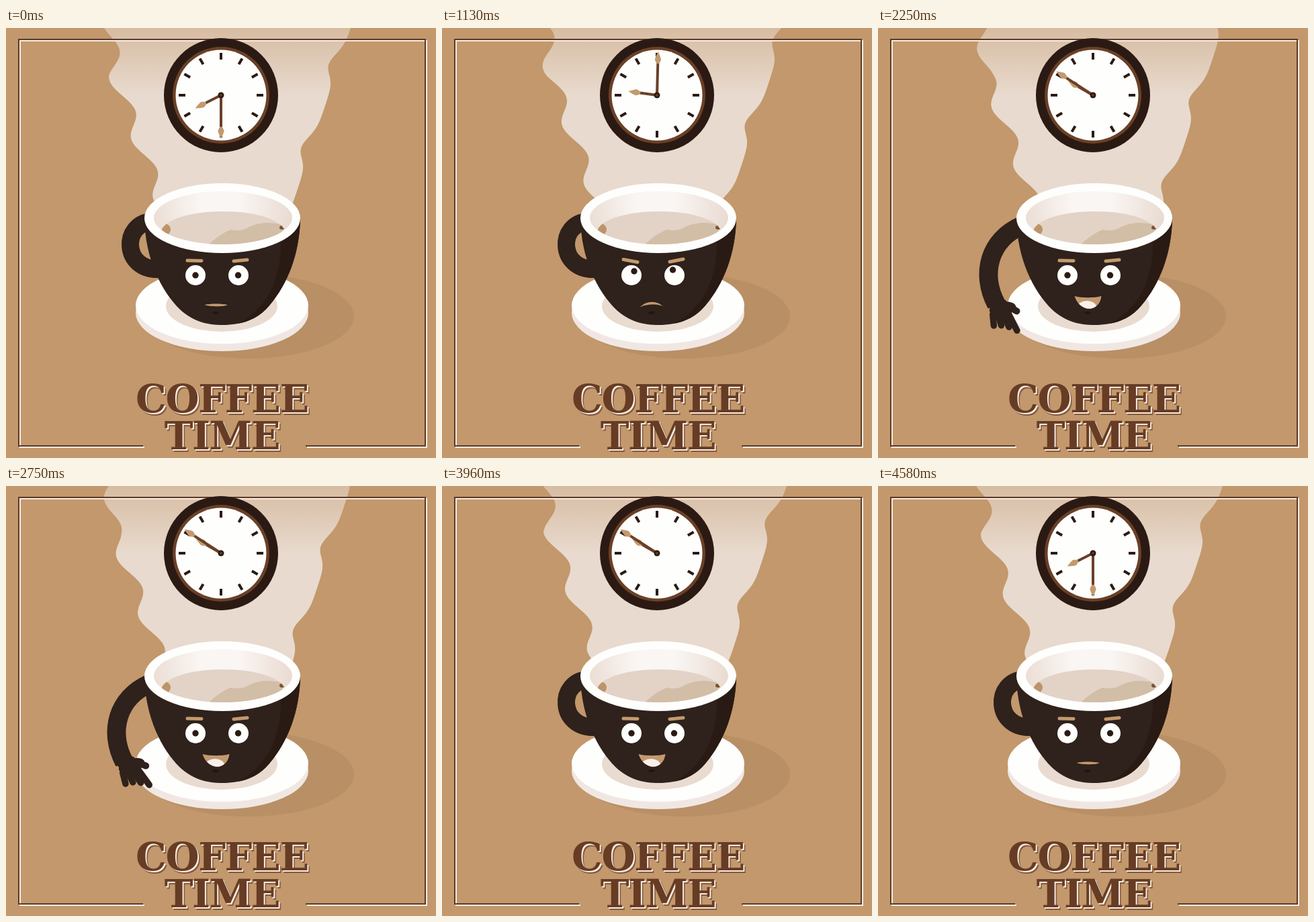
Write an HTML page with a canvas that moves like this. It is 640x640 px and loops after 4680 ms.

```html
<!DOCTYPE html>
<html lang="en">
<head>
<meta charset="utf-8">
<title>Coffee Time</title>
<style>
html, body { margin: 0; width: 100%; height: 100%; overflow: hidden; background: #c2986c; }
canvas, svg { position: absolute; left: 0; top: 0; width: 640px; height: 640px; display: block; }
text { font: bold 57.5px "DejaVu Serif", serif; letter-spacing: -1.4px; text-anchor: middle; }
</style>
</head>
<body>
<canvas id="stage" width="640" height="640"></canvas>
<svg viewBox="0 0 640 640">
  <defs>
    <g id="title"><text x="321.5" y="572">COFFEE</text><text x="321.5" y="627">TIME</text></g>
  </defs>
  <use href="#title" x="3.5" y="3.5" fill="#85583a"/>
  <use href="#title" x="2" y="2" fill="#f7eee7"/>
  <use href="#title" fill="#673c24"/>
</svg>
<script>
const ctx = document.getElementById('stage').getContext('2d');
const LOOP = 4680, TAU = Math.PI * 2, RAD = Math.PI / 180;
const BG = '#c2986c', DARK = '#2f211b', INK = '#2b1a13', BROWN = '#6a4027', TAN = '#c39a6e', WHITE = '#fefefd';

// one bezier each
const HANDLE = [218, 288, 172, 290, 173, 361, 228, 359];
const ARM = [214, 294, 166, 315, 152, 365, 176, 411];
// half width, y of the corners, bend of the upper and lower lip
const NEUTRAL = [17, 412, -2, 3], FROWN = [18, 416, -11, -6], SMILE = [20, 399, 3, 25];

const CUP = new Path2D('M206 283C207 345 232 392 258 418C278 437 300 442 322 442C352 442 375 433 392 413C420 380 437 335 438 283Z');
const SHADE = new Path2D('M438 283C437 335 420 380 392 413C378 430 362 437 345 440C385 420 410 378 409 318Z');
const FOAM = new Path2D('M300 324Q318 306 335 300Q350 304 362 296Q385 286 412 293L410 330Z');
const TIP = new Path2D('M-1.5 0L1.5 0Q5 5 4.5 7Q3 12 0 18Q-3 12 -4.5 7Q-5 5 -1.5 0Z');
const FRAME = new Path2D('M204 622H19V17H624V622H446');

const lerp = (a, b, k) => a + (b - a) * k;
const mix = (a, b, k) => a.map((v, i) => lerp(v, b[i], k));
function ramp(t, a, b) {
  const k = Math.min(1, Math.max(0, (t - a) / (b - a)));
  return k * k * (3 - 2 * k);
}

function ellipse(x, y, rx, ry, fill) {
  ctx.beginPath();
  ctx.ellipse(x, y, rx, ry, 0, 0, TAU);
  ctx.fillStyle = fill;
  ctx.fill();
}
const disc = (x, y, r, fill) => ellipse(x, y, r, r, fill);

function line(x1, y1, x2, y2, width, color, cap = 'round') {
  ctx.beginPath();
  ctx.moveTo(x1, y1);
  ctx.lineTo(x2, y2);
  ctx.lineWidth = width;
  ctx.lineCap = cap;
  ctx.strokeStyle = color;
  ctx.stroke();
}

// the sides of a cone, rippled by waves that climb at their own speeds
function leftEdge(y, t) {
  const u = y + .0165 * t + 1.9e-6 * t * t;
  const cone = 162 + .37 * Math.max(0, y - 70) + .1 * Math.min(0, y - 70);
  return cone - 11 * Math.cos((u - 79) / 88 * TAU);
}
function rightEdge(y, t) {
  const a = (y + .032 * t - 85) / 124 * TAU;
  return 435 - .33 * (y - 214) + 7.5 * Math.sin(a + .8 * Math.cos(a));
}

function steam(t) {
  const fade = ctx.createLinearGradient(0, -60, 0, 100);
  fade.addColorStop(0, 'rgba(232,218,206,0)');
  fade.addColorStop(.12, 'rgba(232,218,206,.36)');
  fade.addColorStop(1, 'rgba(232,218,206,1)');
  ctx.beginPath();
  for (let y = -60; y <= 288; y += 3) ctx.lineTo(leftEdge(y, t), y);
  for (let y = 288; y >= -60; y -= 3) ctx.lineTo(rightEdge(y, t), y);
  ctx.fillStyle = fade;
  ctx.fill();
}

function border() {
  ctx.lineCap = 'butt';
  ctx.lineWidth = 2;
  for (const [d, color] of [[2, '#f6ece4'], [0, '#5f3a27']]) {
    ctx.save();
    ctx.translate(d, d);
    ctx.strokeStyle = color;
    ctx.stroke(FRAME);
    ctx.restore();
  }
}

function hand(angle, length) {
  ctx.save();
  ctx.rotate((angle + 180) * RAD);
  line(0, 0, 0, length, 4, BROWN, 'butt');
  ctx.translate(0, length - 1);
  ctx.fillStyle = TAN;
  ctx.fill(TIP);
  ctx.restore();
}

function clock(t) {
  ctx.save();
  ctx.translate(320, 100);
  disc(0, 0, 85, INK);
  disc(0, 0, 72, BROWN);
  disc(0, 0, 67.5, WHITE);
  for (let i = 0; i < 12; i++) {
    const x = Math.sin(i * TAU / 12), y = Math.cos(i * TAU / 12);
    line(x * 53, y * 53, x * 63, y * 63, 4, INK, 'butt');
  }
  hand(lerp(243, 300, ramp(t, 200, 1820)), 26);
  hand(lerp(180, 663, ramp(t, 575, 1910)), 48);
  disc(0, 0, 4.5, INK);
  disc(0, 0, 1.8, BROWN);
  ctx.restore();
}

function fingers(t, size) {
  ctx.rotate(9 * (Math.cos((t - 1750) / 667 * TAU) - 1) * RAD);
  ctx.scale(size, size);
  ellipse(2, 4, 14, 9, DARK);
  ellipse(8, 11, 20, 10, DARK);
  for (let i = 0; i < 4; i++) line(-8 + 7.5 * i, 17, -9 + 11 * i, 34 + 1.4 * i * i, 9.5, DARK);
  line(14, 7, 28, 18, 10, DARK);
}

function arm(t) {
  const out = ramp(t, 1250, 1600) * (1 - ramp(t, 3050, 3350));
  const size = ramp(t, 1400, 1650) * (1 - ramp(t, 3000, 3200));
  const p = mix(HANDLE, ARM, out);
  ctx.beginPath();
  ctx.moveTo(p[0], p[1]);
  ctx.bezierCurveTo(...p.slice(2));
  ctx.lineCap = 'butt';
  ctx.lineWidth = lerp(26, 28, out);
  ctx.strokeStyle = DARK;
  ctx.stroke();
  if (!size) return;
  ctx.save();
  ctx.translate(p[6], p[7] - 3);
  fingers(t, size);
  ctx.restore();
}

function mouth([w, y, up, down], smile) {
  const x = 312.5;
  ctx.save();
  ctx.beginPath();
  ctx.moveTo(x - w, y);
  ctx.bezierCurveTo(x - w / 2, y + up, x + w / 2, y + up, x + w, y);
  ctx.bezierCurveTo(x + w * .85, y + down, x - w * .6, y + down, x - w, y);
  ctx.fillStyle = TAN;
  ctx.fill();
  ctx.clip();
  ctx.globalAlpha = smile;
  ellipse(311, 415, 14, 9, '#f8f0eb');
  ctx.restore();
}

function face(t) {
  const calm = 1 - ramp(t, 1200, 1450);
  const look = ramp(t, 450, 700) * calm, frown = ramp(t, 500, 850) * calm, smile = ramp(t, 1400, 1700);
  line(270, 346 - frown * 1.5, 291, 346.5 + frown * 2, 5, TAN);
  line(339, 347 + frown, 359, 345 - frown, 5, TAN);
  disc(282, 368, 15, WHITE);
  disc(346, 368, 15, WHITE);
  disc(282 + look * 4, 368 - look * 6, 4.7, INK);
  disc(345.5 - look * 2, 368 - look * 8, 4.7, INK);
  ellipse(312, 424, 5, 2, '#231611');
  mouth(mix(mix(NEUTRAL, FROWN, frown), SMILE, smile), smile);
}

function drink() {
  ellipse(322, 283, 116, 52, WHITE);
  ctx.save();
  ctx.beginPath();
  ctx.ellipse(323, 282.5, 103, 39.5, 0, 0, TAU);
  ctx.clip();
  const glow = ctx.createRadialGradient(318, 258, 30, 318, 268, 105);
  glow.addColorStop(0, '#faf6f3');
  glow.addColorStop(1, '#eadcd3');
  ctx.fillStyle = glow;
  ctx.fillRect(210, 235, 230, 95);
  ctx.beginPath();
  ctx.ellipse(323, 304, 92, 31, 0, 0, TAU);
  ctx.fillStyle = '#e2d3c6';
  ctx.fill();
  ctx.clip();
  ctx.fillStyle = '#d2bda6';
  ctx.fill(FOAM);
  ellipse(236, 300, 9, 9, '#bd946a');
  ellipse(411, 297, 4, 3, '#7a5334');
  ctx.restore();
}

function objects(t) {
  clock(t);
  ellipse(321.5, 424, 128.5, 57, '#f1e7e2');
  ellipse(321.5, 413, 128.5, 57, WHITE);
  ellipse(321, 414, 83, 38, '#e9dbd0');
  arm(t);
  ctx.fillStyle = DARK;
  ctx.fill(CUP);
  ctx.fillStyle = '#291a14';
  ctx.fill(SHADE);
  drink();
  face(t);
}

function shrink(t) {
  const k = Math.max(0, (t - 4042) / 440), s = Math.max(0, 1 - k * k);
  ctx.translate(316, 481);
  ctx.scale(s, s);
  ctx.translate(-316, -481);
}

function flyIn(t) {
  const q = Math.pow(Math.max(0, (4580 - t) / 250), 1.5), s = 1 + 1.5 * q;
  ctx.translate(321 - 562 * q, 413 - 472 * q);
  ctx.rotate(30 * q * RAD);
  ctx.scale(s, s);
  ctx.translate(-321, -413);
}

function placed(move, part, t, age) {
  ctx.save();
  move(t);
  part(age);
  ctx.restore();
}

function draw(t) {
  const layer = part => {
    if (t < 4480) placed(shrink, part, t, t);
    if (t > 4240) placed(flyIn, part, t, 0);
  };
  ctx.fillStyle = BG;
  ctx.fillRect(0, 0, 640, 640);
  ellipse(361, 429, 157, 63, '#b98f66');
  layer(steam);
  border();
  layer(objects);
}

const start = performance.now();
function tick() {
  draw((performance.now() - start) % LOOP);
  requestAnimationFrame(tick);
}
tick();
</script>
</body>
</html>
```
